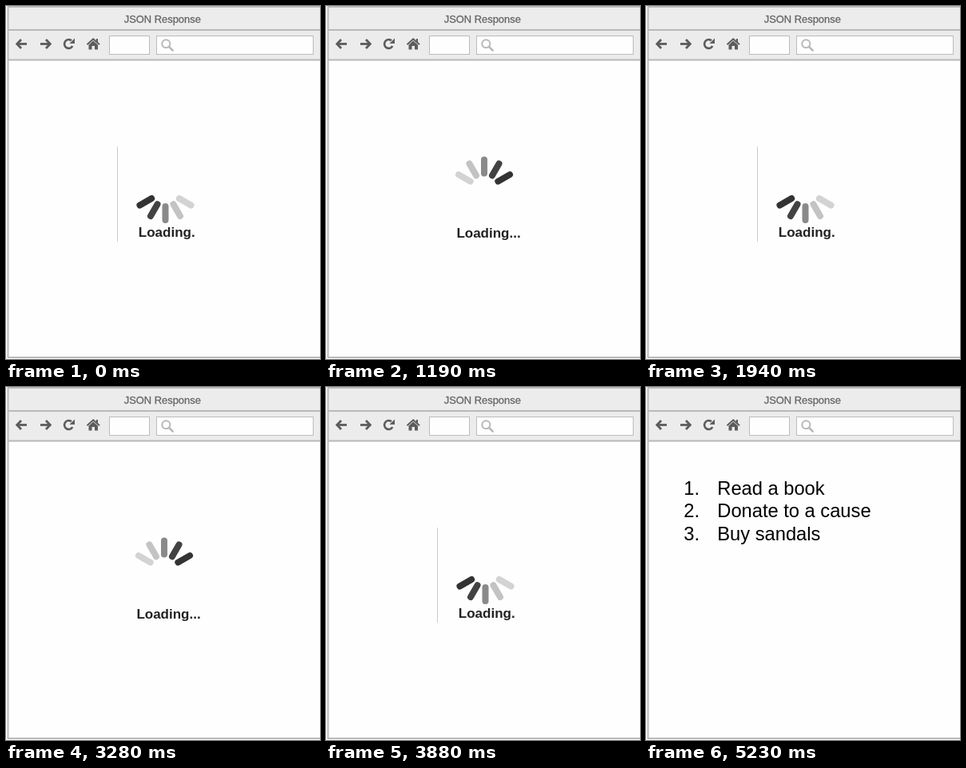
An HTML page with a canvas for the animation above (7.48 s loop, 393 by 442 pixels).

```html
<!DOCTYPE html>
<html lang="en">
<head>
<meta charset="utf-8">
<title>JSON Response</title>
<style>
html, body { margin: 0; width: 100%; height: 100%; overflow: hidden; background: #fefefe; }
canvas { display: block; width: 393px; height: 442px; }
</style>
</head>
<body>
<canvas id="stage"></canvas>
<script>
const W = 393, H = 442, LOOP = 7480;
const canvas = document.getElementById('stage');
const ctx = canvas.getContext('2d');
const ratio = window.devicePixelRatio || 1;
canvas.width = W * ratio;
canvas.height = H * ratio;
ctx.scale(ratio, ratio);

const FONT = '"Liberation Sans", Arial, sans-serif';
const SHADES = ['#333', '#424242', '#8a8a8a', '#c3c3c3', '#d3d3d3'];

// Spoke angles run from darkest to lightest, in degrees clockwise from the right.
const POSES = [
  { x: 199.5, y: 231, angles: [150, 120, 90, 60, 30], dots: 1, textX: 165.8, baseline: 289, rule: true },
  { x: 199, y: 231, angles: [210, 180, 150, 120, 90], dots: 2, textX: 164.6, baseline: 289 },
  { x: 198, y: 229.6, angles: [330, 300, 270, 240, 210], dots: 3, textX: 163.4, baseline: 290 }
];
const CHANGES = [440, 1190, 1940, 2530, 3280, 3880, 4630, 5230];
const ITEMS = ['Read a book', 'Donate to a cause', 'Buy sandals'];

function line(points, color, width, cap = 'butt') {
  ctx.beginPath();
  points.forEach(([x, y]) => ctx.lineTo(x, y));
  ctx.strokeStyle = color;
  ctx.lineWidth = width;
  ctx.lineCap = cap;
  ctx.lineJoin = 'miter';
  ctx.stroke();
}

function shape(points, color) {
  ctx.beginPath();
  points.forEach(([x, y]) => ctx.lineTo(x, y));
  ctx.fillStyle = color;
  ctx.fill();
}

function text(str, x, y, size, color, weight = 'normal') {
  ctx.font = `${weight} ${size}px ${FONT}`;
  ctx.fillStyle = color;
  ctx.fillText(str, x, y);
}

function field(x, width) {
  ctx.fillStyle = '#fefefe';
  ctx.fillRect(x, 37.5, width, 23);
  ctx.strokeStyle = '#bcbcbc';
  ctx.lineWidth = 1;
  ctx.strokeRect(x, 37.5, width, 23);
}

function arrow(x, dir) {
  const ink = '#5c5c5c';
  line([[x - 6 * dir, 47.5], [x + 6 * dir, 47.5]], ink, 2.8);
  line([[x + dir, 42], [x + 6.3 * dir, 47.5], [x + dir, 53]], ink, 2.8);
}

function reloadIcon() {
  ctx.beginPath();
  ctx.arc(78.5, 47.5, 5.4, 0.5, 5.4);
  ctx.strokeStyle = '#5c5c5c';
  ctx.lineWidth = 2.6;
  ctx.lineCap = 'butt';
  ctx.stroke();
  shape([[86, 40.5], [86, 47], [79.5, 47]], '#5c5c5c');
}

function homeIcon() {
  const ink = '#5c5c5c';
  line([[101.5, 48.3], [109.2, 41.3], [117, 48.3]], ink, 2);
  shape([[103.5, 48.8], [109.2, 43.6], [115, 48.8], [115, 54.5], [111, 54.5],
    [111, 50], [107.5, 50], [107.5, 54.5], [103.5, 54.5]], ink);
  ctx.fillRect(112.8, 41, 2.2, 4);
}

function browser() {
  ctx.fillStyle = '#fefefe';
  ctx.fillRect(0, 0, W, H);
  ctx.fillStyle = '#ececec';
  ctx.fillRect(2, 1, W - 2, 66);
  const edge = '#b9b9b9';
  for (const y of [1, 30, 67.5, 440]) line([[2, y], [W, y]], edge, 2);
  line([[2.5, 0], [2.5, 441]], edge, 2);

  text('JSON Response', 147.8, 21, 12.9, '#666');
  ctx.strokeStyle = '#666';
  ctx.lineWidth = 0.3;
  ctx.strokeText('JSON Response', 147.8, 21);

  arrow(20, -1);
  arrow(49, 1);
  reloadIcon();
  homeIcon();
  field(129.5, 50);
  field(188.5, 196);

  ctx.beginPath();
  ctx.arc(200.3, 47.3, 5, 0, Math.PI * 2);
  ctx.strokeStyle = '#b8b8b8';
  ctx.lineWidth = 2;
  ctx.stroke();
  line([[204, 51], [208.7, 55.7]], '#b8b8b8', 2.6, 'round');
}

function loader(pose) {
  if (pose.rule) line([[139.5, 176], [139.5, 295]], '#cbcbcb', 1);
  pose.angles.forEach((deg, i) => {
    const a = deg * Math.PI / 180;
    const at = r => [pose.x + r * Math.cos(a), pose.y + r * Math.sin(a)];
    line([at(20), at(37)], SHADES[i], 8, 'round');
  });
  text('Loading' + '.'.repeat(pose.dots), pose.textX, pose.baseline, 17, '#222', 'bold');
}

function list() {
  ITEMS.forEach((item, i) => {
    const y = 135 + Math.round(i * 28.4);
    text(`${i + 1}.`, 47.3, y, 23.7, '#000');
    text(item, 89.3, y, 23.7, '#000');
  });
}

function draw() {
  const t = performance.now() % LOOP;
  const step = CHANGES.filter(change => t >= change).length;
  browser();
  if (step < CHANGES.length) loader(POSES[step % POSES.length]);
  else list();
  requestAnimationFrame(draw);
}
draw();
</script>
</body>
</html>
```
